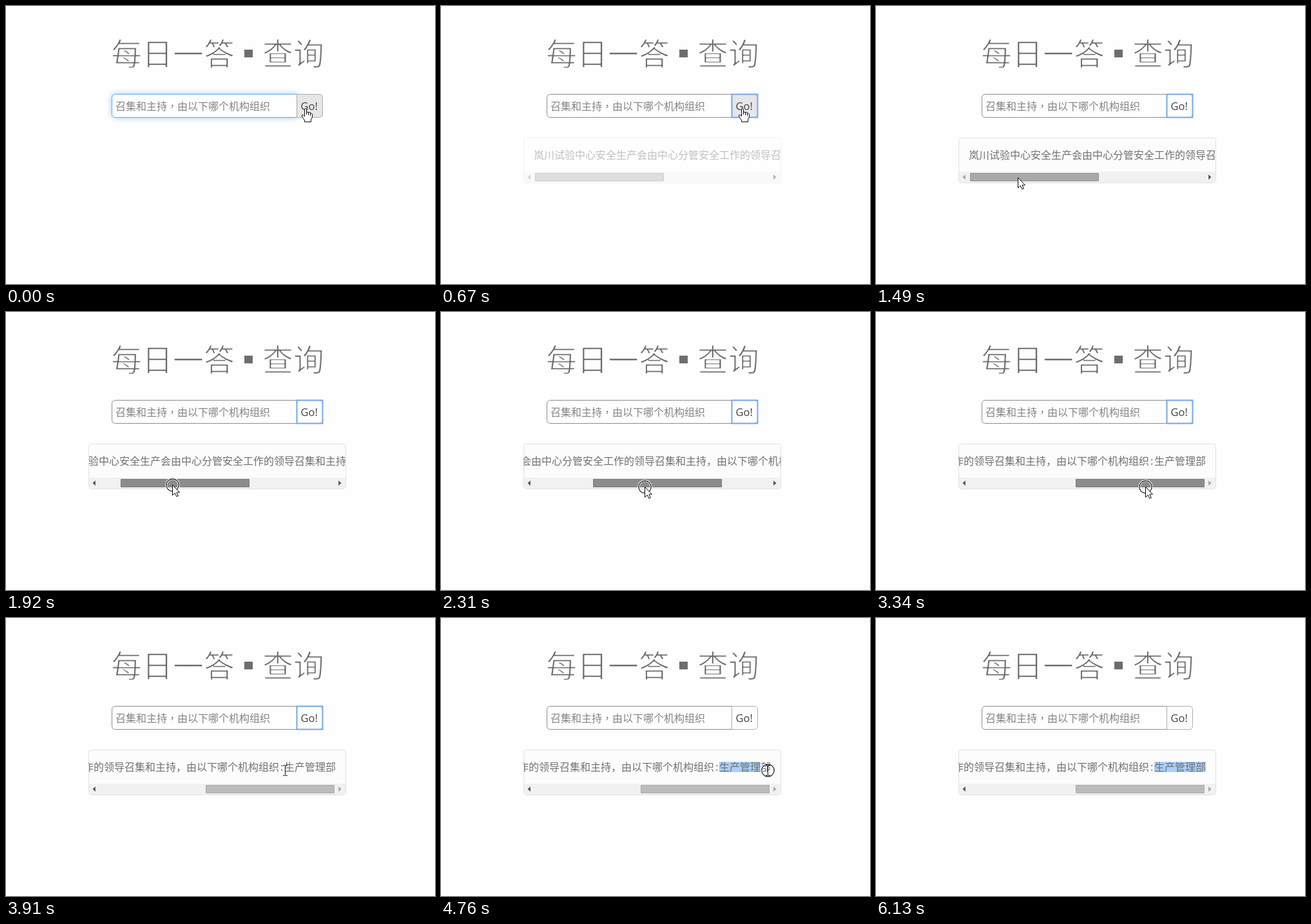
These frames come from a looping animation (666x433 px, 6900 ms). An HTML page with a canvas:

```html
<!DOCTYPE html>
<html lang="zh-CN">
<head>
<meta charset="utf-8">
<title>每日一答</title>
<style>
html, body { margin: 0; width: 100%; height: 100%; overflow: hidden; background: #fefefe; }
canvas { display: block; }
</style>
</head>
<body>
<canvas id="stage" width="666" height="433"></canvas>
<script>
const ctx = document.getElementById('stage').getContext('2d');
const LOOP = 6900;
const STEP = 136;   // ms between screen refreshes
const LEAD = 62;    // first refresh comes early
const PAGE = '#fefefe';
const CJK = '"Noto Sans CJK SC", "Noto Sans CJK", sans-serif';
const CJK_TC = '"Noto Sans CJK TC", "Noto Sans CJK", sans-serif';
const MAX_SCROLL = 164;

const CLICK = 3, SHOW = 4, LEAVE = 8, HOVER = 10, GRAB = 13, DROP = 26,
  BEAM = 28, SELECT = 31, SELECTED = 38, GONE = 45;

const linear = k => k;
const easeOut = k => 1 - (1 - k) ** 2;
const smooth = k => k * k * (3 - 2 * k);

// Pointer moves: first and last refresh, destination, easing
const moves = [
  [0, 1, 468, 159, linear],
  [6, 10, 220, 267, smooth],
  [12, 17, 316, 272, linear],
  [17, 25, 418, 272, linear],
  [25, 29, 433, 237, linear],
  [32, 36, 512, 237, easeOut],
  [37, 41, 511, 243, linear],
  [41, 45, 590, 460, linear]
];

const clamp = (v, lo, hi) => Math.min(hi, Math.max(lo, v));
const within = (n, a, b) => n >= a && n < b;

function pointerAt(n) {
  let x = 465, y = 159;
  for (const [from, to, toX, toY, ease] of moves) {
    const k = ease(clamp((n - from) / (to - from), 0, 1));
    x += (toX - x) * k;
    y += (toY - y) * k;
  }
  return [Math.round(x), Math.round(y)];
}

function text(str, x, y, size, color, family = CJK) {
  ctx.font = `${size}px ${family}`;
  ctx.fillStyle = color;
  ctx.fillText(str, x, y);
}

// Light weight: trims the outline with the page colour.
function lightText(str, x, y, size, color) {
  text(str, x, y, size, color);
  ctx.strokeStyle = PAGE;
  ctx.lineWidth = 1.5;
  ctx.lineJoin = 'round';
  ctx.strokeText(str, x, y);
  ctx.lineJoin = 'miter';
}

function box(x, y, w, h, radii, fill, stroke, glow = 0) {
  ctx.beginPath();
  ctx.roundRect(x, y, w, h, radii);
  ctx.save();
  if (glow) {
    ctx.shadowColor = `rgba(82, 168, 236, ${glow})`;
    ctx.shadowBlur = 8;
  }
  ctx.fillStyle = fill;
  ctx.fill();
  ctx.restore();
  ctx.strokeStyle = stroke;
  ctx.lineWidth = 1;
  ctx.stroke();
}

function polygon(points, fill) {
  ctx.beginPath();
  points.forEach(([x, y]) => ctx.lineTo(x, y));
  ctx.closePath();
  ctx.fillStyle = fill;
  ctx.fill();
}

function drawTitle() {
  const ink = '#6e6c6c';
  lightText('每日一答', 163, 92, 48, ink);
  ctx.fillRect(370, 68, 13, 12);
  lightText('查询', 398, 92, 48, ink);
}

function drawForm(n) {
  const glow = clamp(1 - (n - 2) / 2, 0, 1);
  box(164.5, 137.5, 287, 36, [5, 0, 0, 5], PAGE, glow ? '#66afe9' : '#8c8c8c', glow * 0.7);

  const ink = '#838383';
  text('召集和主持', 170, 162, 16, ink);
  text('，', 250, 162, 16, ink, CJK_TC);
  text('由以下哪个机构组织', 266, 162, 16, ink);

  box(451.5, 137.5, 40, 36, [0, 5, 5, 0], n < LEAVE ? '#e6e6e6' : PAGE, '#adadad');
  if (within(n, CLICK, SELECT)) {
    ctx.strokeStyle = '#74a6ec';
    ctx.lineWidth = 2;
    ctx.strokeRect(451.5, 137.5, 40, 36);
  }
  text('Go!', 457.5, 162, 16.5, '#444', '"Open Sans", "Noto Sans", sans-serif');
}

function drawScrollbar(n, scroll) {
  ctx.fillStyle = '#f1f1f1';
  ctx.fillRect(129, 258, 398, 17);
  const shade = within(n, GRAB, DROP) ? 140 : within(n, HOVER, DROP + 1) ? 169 : 188;
  const gray = v => `rgb(${v}, ${v}, ${v})`;
  box(146.5 + scroll, 260.5, 199, 12, 0, gray(shade), gray(shade - 20));

  const arrow = (tip, dir, active) => polygon(
    [[tip, 266.5], [tip + dir * 4.3, 262.5], [tip + dir * 4.3, 270.5]],
    active ? '#505050' : '#a3a3a3');
  arrow(134.5, 1, scroll > 0);
  arrow(520.5, -1, scroll < MAX_SCROLL);
}

// The highlight trails the pointer by one refresh.
function selectedChars(n) {
  if (n < SELECT) return 0;
  const [x] = pointerAt(Math.min(n, SELECTED) - 1);
  return clamp(Math.round((x - 432) / 16), 0, 5);
}

function drawResult(n) {
  if (n <= SHOW) return;
  const [x] = pointerAt(Math.min(n, DROP - 1));
  const scroll = n < GRAB ? 0 : clamp(x - 226, 0, MAX_SCROLL);
  const left = 144 - scroll * 2;
  const answer = left + 616;
  ctx.save();
  ctx.globalAlpha = easeOut(clamp((n - SHOW) / 4, 0, 1));
  box(128.5, 205.5, 399, 70, 4, '#fcfcfc', '#e1e1e1');
  ctx.clip();
  ctx.fillStyle = '#a9cffa';
  ctx.fillRect(answer, 224, selectedChars(n) * 16, 16);
  const ink = '#707070';
  text('岚川试验中心安全生产会由中心分管安全工作的领导召集和主持，由以下哪个机构组织', left, 238, 16, ink);
  text(':', answer - 6, 238, 16, ink);
  text('生产管理部', answer, 238, 16, ink);
  drawScrollbar(n, scroll);
  ctx.restore();
}

function drawRing(x, y) {
  for (const [color, width] of [['#fff', 3], ['#111', 1.2]]) {
    ctx.beginPath();
    ctx.arc(x + 0.5, y + 0.5, 9.7, 0, Math.PI * 2);
    ctx.strokeStyle = color;
    ctx.lineWidth = width;
    ctx.stroke();
  }
}

function outlined(points) {
  polygon(points, '#fff');
  ctx.strokeStyle = '#0a0a14';
  ctx.lineWidth = 1;
  ctx.stroke();
}

function drawArrow() {
  outlined([[0.5, 0.5], [0.5, 16.5], [4.3, 13], [6.8, 18.4], [9.3, 17.4], [6.9, 12], [11.5, 12]]);
}

function drawHand() {
  outlined([[-1.5, 1.5], [0, 0.5], [1.5, 1.5], [1.5, 6], [7, 7], [10.5, 9.5], [10.5, 14],
    [8.5, 18], [8.5, 21.5], [-1.5, 21.5], [-1.5, 19], [-5.5, 13], [-5.5, 11], [-4, 10.5], [-1.5, 13]]);
  ctx.beginPath();
  for (let i = 0; i < 3; i++) {
    ctx.moveTo(1.5 + i * 3, 6 + i);
    ctx.lineTo(1.5 + i * 3, 10 + i);
  }
  ctx.stroke();
}

function drawBeam() {
  ctx.fillStyle = '#111';
  ctx.fillRect(0, -7, 1, 15);
  for (const y of [-8, 8]) {
    ctx.fillRect(-3, y, 3, 1);
    ctx.fillRect(1, y, 3, 1);
  }
}

function drawPointer(n) {
  if (n >= GONE) return;
  const [x, y] = pointerAt(n);
  const pressed = n === CLICK || within(n, GRAB, DROP) || within(n, SELECT, SELECTED);
  if (pressed) drawRing(x, y);
  ctx.save();
  ctx.translate(x, y);
  if (n < LEAVE) drawHand();
  else if (within(n, BEAM, SELECTED)) drawBeam();
  else drawArrow();
  ctx.restore();
}

function render(time) {
  const n = Math.floor((time + LEAD) / STEP);
  ctx.fillStyle = PAGE;
  ctx.fillRect(0, 0, 666, 433);
  drawTitle();
  drawForm(n);
  drawResult(n);
  drawPointer(n);
}

const start = performance.now();
function loop() {
  render((performance.now() - start) % LOOP);
  requestAnimationFrame(loop);
}
loop();
</script>
</body>
</html>
```
